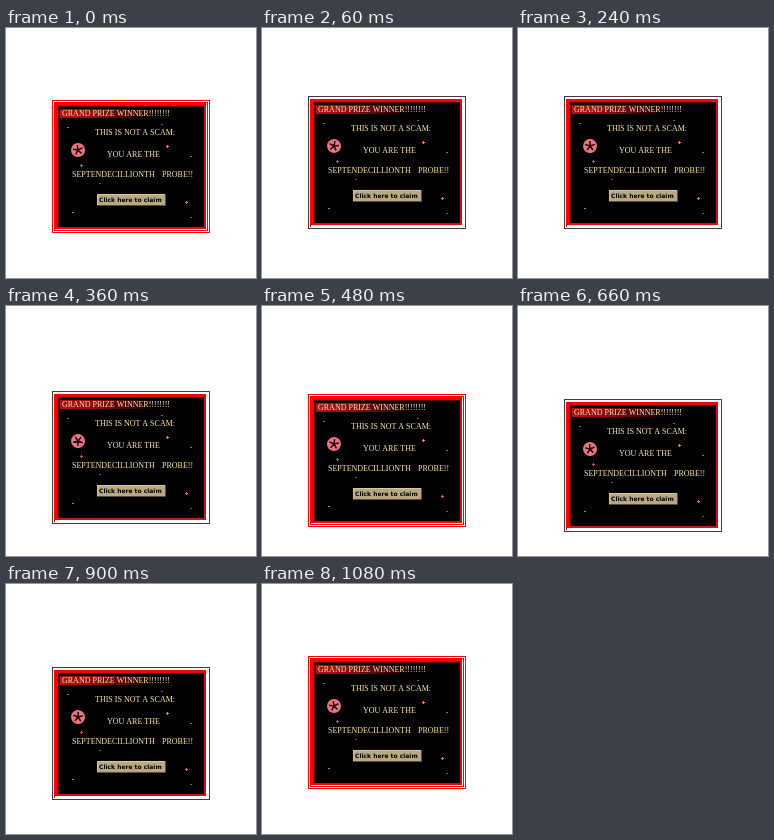
Animation of 250x250 px, one loop 1140 ms. Source, as an HTML page with a canvas:

```html
<!DOCTYPE html>
<html lang="en">
<head>
<meta charset="utf-8">
<style>
html, body { margin: 0; width: 100%; height: 100%; overflow: hidden; background: #fff; }
canvas { display: block; width: 250px; height: 250px; }
</style>
</head>
<body>
<canvas id="stage" width="250" height="250"></canvas>
<script>
const ctx = document.getElementById('stage').getContext('2d', { alpha: false });
const STEP = 60, STEPS = 19;
const LEFT = 46, W = 158, H = 133;
const RED = '#ff0000', TAN = '#ffe6ae';
const SERIF = '8px "Liberation Serif", Times, serif';

// [step, top of the window], joined by straight lines
const path = [[0, 72], [3, 59], [6, 85], [12, 94], [18, 72]];

// [x, y, colour, is it a cross]
const stars = [
  [62, 27, '#c86460'], [156, 24, '#a05050'], [161, 46, '#f08080', true],
  [75, 65, '#d85058', true], [185, 56, '#a06050'], [94, 83, '#904a44'],
  [67, 112, '#c08068'], [180, 102, '#e86070', true], [185, 117, '#a04848']
];

function topAt(n) {
  let i = 1;
  while (n > path[i][0]) i++;
  const [a, from] = path[i - 1], [b, to] = path[i];
  return Math.round(from + (to - from) * (n - a) / (b - a));
}

function rect(x, y, w, h, color) {
  ctx.fillStyle = color;
  ctx.fillRect(x, y, w, h);
}

function inset(d, color) {
  rect(LEFT + d, d, W - 2 * d, H - 2 * d, color);
}

function text(str, x, y, font = SERIF, color = TAN) {
  ctx.font = font;
  ctx.fillStyle = color;
  ctx.fillText(str, x, y);
}

function drawBorder(lit) {
  inset(0, lit ? RED : '#49383a');
  inset(1, '#fff');
  if (lit) {
    inset(2, RED);
    inset(3, '#fff');
  } else {
    rect(LEFT + 2, 3, 1, H - 5, RED);
  }
  // the raised frame is thicker at the top and left
  rect(LEFT + 3, 3, W - 7, H - 7, RED);
  inset(5, '#d80c10');
  inset(6, '#500404');
  rect(LEFT + 7, 7, W - 13, H - 13, '#000');
}

function drawWheel(n) {
  ctx.save();
  ctx.translate(72, 50);
  ctx.rotate(Math.PI / 4 + n * Math.PI / 9);
  ctx.fillStyle = '#ec7480';
  ctx.beginPath();
  ctx.arc(0, 0, 7, 0, 7);
  ctx.fill();
  ctx.strokeStyle = '#200508';
  ctx.lineWidth = 1.5;
  ctx.beginPath();
  for (let i = 0; i < 5; i++) {
    const a = i * Math.PI * 2 / 5;
    ctx.moveTo(0, 0);
    ctx.lineTo(5 * Math.cos(a), 5 * Math.sin(a));
  }
  ctx.stroke();
  ctx.restore();
}

function drawStars() {
  for (const [x, y, color, cross] of stars) {
    if (cross) {
      rect(x - 1, y, 3, 1, color);
      rect(x, y - 1, 1, 3, color);
    } else {
      rect(x - 1, y, 2, 1, color);
    }
  }
}

function drawButton() {
  rect(91, 94, 69, 12, '#5c4d38');
  rect(91, 94, 68, 11, '#d8c8a0');
  rect(92, 95, 67, 10, '#b9a880');
  text('Click here to claim', 93, 102, 'bold 6px "DejaVu Sans", Verdana, sans-serif', '#000');
}

function draw(n) {
  rect(0, 0, 250, 250, '#fff');
  ctx.save();
  ctx.translate(0, topAt(n));
  drawBorder([0, 7, 8].includes(n % 9));

  const bar = ctx.createLinearGradient(54, 0, 150, 0);
  bar.addColorStop(0, '#b41014');
  bar.addColorStop(0.4, '#8c0a0e');
  bar.addColorStop(1, '#000');
  rect(54, 9, 96, 9, bar);

  drawStars();
  drawWheel(n);
  text('GRAND PRIZE WINNER!!!!!!!!', 56, 16);
  text('THIS IS NOT A SCAM:', 89, 35);
  text('YOU ARE THE', 101, 57);
  text('SEPTENDECILLIONTH', 66, 77);
  text('PROBE!!', 156, 77);
  drawButton();
  ctx.restore();
}

function tick() {
  draw(Math.floor(performance.now() / STEP) % STEPS);
  requestAnimationFrame(tick);
}
tick();
</script>
</body>
</html>
```
